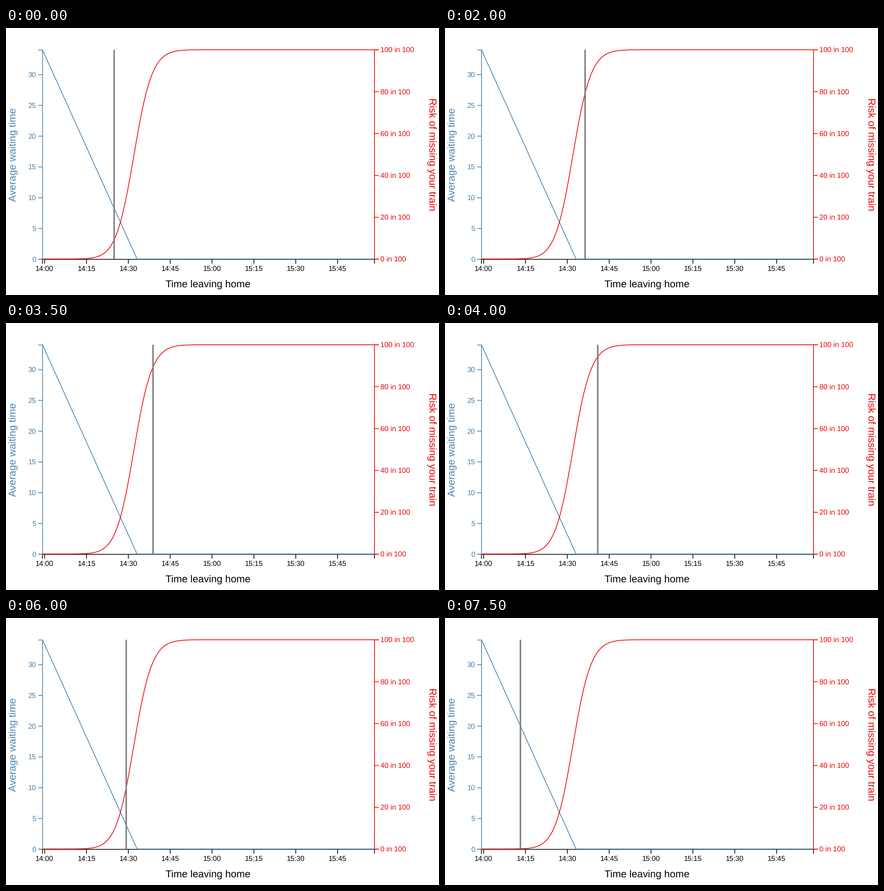
These frames come from a looping animation (953x588 px, 8 s). A matplotlib script:

```python
import numpy as np
import matplotlib.pyplot as plt
from matplotlib.animation import FuncAnimation

plt.rcParams.update({
    "font.family": "Liberation Sans",
    "text.hinting": "no_hinting",
    "path.snap": False,
    "lines.solid_capstyle": "butt",
    "lines.solid_joinstyle": "miter",
})

# A power of two keeps size * dpi exact
W, H, DPI = 953, 588, 64
PX = 72 / DPI
BLUE, RED, BLACK, GREY = "#4682b4", "#ee0000", "#000000", "#808080"
LEFT, RIGHT, TOP, BOTTOM = 80.2, 811.0, 47.9, 508.7
TICK, HALF = 9.5, 0.6
SMALL, LARGE = 15.9, 22.2

# Where the marker rests during each half second
MARKER_X = [238, 214.2, 256.5, 275.7, 308.3, 339, 318.4, 323.6,
            336.2, 330, 206, 300.8, 264.6, 252, 236, 166]

fig = plt.figure(figsize=(W / DPI, H / DPI), dpi=DPI, facecolor="white")
ax = fig.add_axes([0, 0, 1, 1])
ax.set_xlim(0, W)
ax.set_ylim(H, 0)
ax.axis("off")


def line(x, y, color, width=1.6):
    return ax.plot(x, y, color=color, lw=width * PX)[0]


def label(x, y, text, color, size=SMALL, ha="center", angle=0):
    ax.text(x, y, text, color=color, fontsize=size * PX, ha=ha,
            va="baseline", rotation=angle, rotation_mode="anchor")


def risk(x):
    u = x - 281.8
    return 1 / (1 + np.exp(-(0.0505 * u - 1.5e-5 * u**2 + 6e-7 * u**3)))


def draw_time_axis():
    y = BOTTOM + 0.8
    line([LEFT, LEFT, RIGHT, RIGHT], [y + TICK, y, y, y + TICK], BLACK)
    for k in range(8):
        x = 85.1 + 92.1 * k
        line([x, x], [y, y + TICK], BLACK)
        label(x, 534.5, f"{14 + k // 4}:{k % 4 * 15:02d}", BLACK)
    label(445, 571, "Time leaving home", BLACK, LARGE)


def draw_wait_axis():
    x, top, bottom = LEFT + 0.2, TOP + HALF, BOTTOM + HALF
    line([x - TICK, x, x, x - TICK], [top, top, bottom, bottom], BLUE)
    for v in range(0, 31, 5):
        y = bottom - v * (bottom - top) / 34
        line([x - TICK, x], [y, y], BLUE)
        label(66, y + 5.2, str(v), BLUE, ha="right")
    label(22.5, 278.5, "Average waiting time", BLUE, LARGE, angle=90)


def draw_risk_axis():
    x, top, bottom = RIGHT, TOP + 0.3, BOTTOM + 0.3
    line([x + TICK, x, x, x + TICK], [top, top, bottom, bottom], RED)
    for v in range(0, 101, 20):
        y = bottom - v * (bottom - top) / 100
        line([x, x + TICK], [y, y], RED)
        label(824, y + 5, f"{v} in 100", RED, ha="left")
    label(930.5, 278.5, "Risk of missing your train", RED, LARGE, angle=270)


draw_time_axis()
draw_wait_axis()
draw_risk_axis()

line([LEFT, 288.4, RIGHT], [TOP, BOTTOM, BOTTOM], BLUE)
xs = np.linspace(LEFT, RIGHT, 732)
line(xs, BOTTOM - (BOTTOM - TOP) * risk(xs), RED)
marker = line([MARKER_X[0]] * 2, [TOP, BOTTOM], GREY, 3.3)


def update(i):
    marker.set_xdata([MARKER_X[i]] * 2)
    return (marker,)


anim = FuncAnimation(fig, update, frames=len(MARKER_X), interval=500,
                     repeat=True, repeat_delay=0, blit=False)
plt.show()
```
